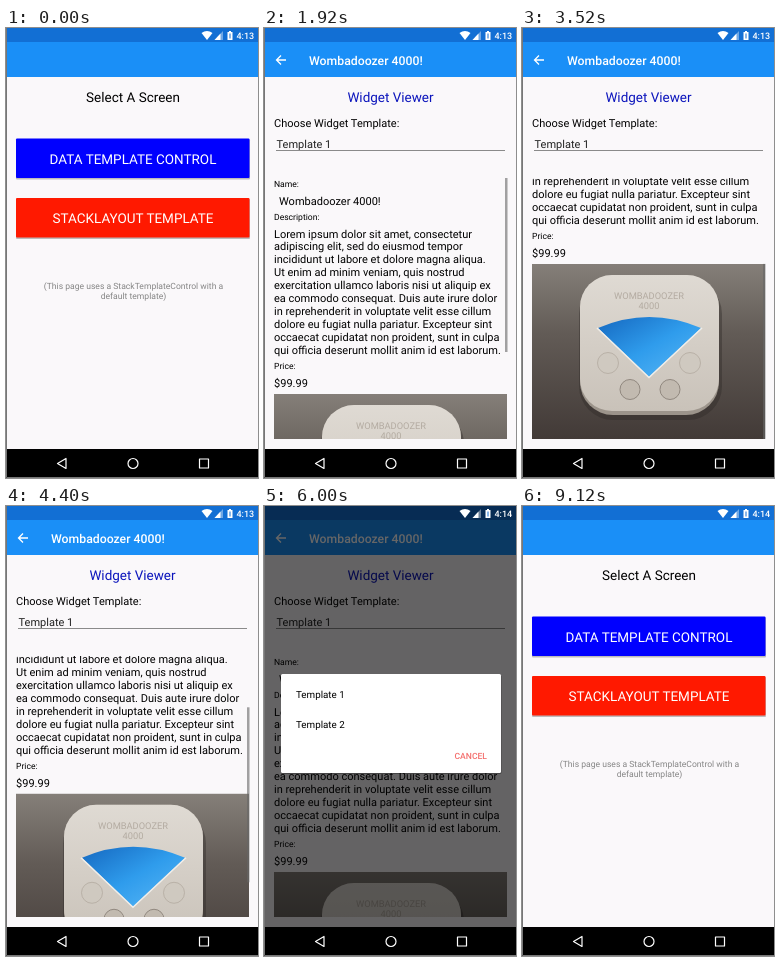
Animation of 252x450 px, one loop 9.2 s. Source, as an HTML page:

```html
<!DOCTYPE html>
<html lang="en">
<head>
<meta charset="utf-8">
<title>Template demo</title>
<style>
html, body { margin: 0; width: 100%; height: 100%; overflow: hidden; background: #000; }
svg { display: block; width: 252px; height: 450px; font-family: Roboto, "Noto Sans", sans-serif; fill: #000; text-rendering: geometricPrecision; }
.large { font-size: 13.49px; }
.medium { font-size: 11.03px; }
.small { font-size: 8.58px; }
.item { font-size: 9.8px; }
.bold { font-weight: 500; }
.mid { text-anchor: middle; }
.white { fill: #fff; }
</style>
</head>
<body>
<svg viewBox="0 0 252 450">
  <defs>
    <clipPath id="pageClip"><rect y="49" width="252" height="372"/></clipPath>
    <clipPath id="listClip"><rect y="150" width="252" height="261"/></clipPath>
    <clipPath id="noteClip"><rect x="126" y="236" width="126" height="84.5"/></clipPath>
    <linearGradient id="wall" x2="0" y2="1">
      <stop stop-color="#857f79"/><stop offset=".4" stop-color="#625b56"/><stop offset="1" stop-color="#423a37"/>
    </linearGradient>
    <linearGradient id="shell" x2="0" y2="1">
      <stop stop-color="#dfdad3"/><stop offset="1" stop-color="#c9c2b9"/>
    </linearGradient>
    <linearGradient id="fan" x2="1" y2="1">
      <stop stop-color="#1568c0"/><stop offset=".5" stop-color="#2f9cec"/><stop offset="1" stop-color="#5bb8f6"/>
    </linearGradient>
    <g id="photo">
      <rect width="233" height="175" fill="url(#wall)"/>
      <rect x="47" y="16" width="143" height="140" rx="34" fill="#2e2826" opacity=".4"/>
      <rect x="48" y="11" width="139" height="140" rx="33" fill="#9c948b"/>
      <rect x="48" y="11" width="139" height="136" rx="32" fill="url(#shell)"/>
      <g class="mid" font-size="9.3" style="fill:#b3aba1">
        <text x="117" y="35">WOMBADOOZER</text><text x="117" y="45">4000</text>
      </g>
      <g fill="#cfc9c0" stroke="#b9b1a7"><circle cx="76" cy="99" r="10.5"/><circle cx="158" cy="99" r="10.5"/></g>
      <path d="M66 64Q117 42 169 64L117 113Z" fill="url(#fan)"/>
      <path d="M65 64L117 113.5L170 64" fill="none" stroke="#f0eeea" stroke-width="1.5"/>
      <g fill="#c2bab0" stroke="#91887f"><circle cx="98" cy="125.5" r="10"/><circle cx="138" cy="125.5" r="10"/></g>
    </g>
  </defs>

  <rect width="252" height="421" fill="#faf8fa"/>
  <g clip-path="url(#pageClip)">
    <g id="home">
      <text class="large mid" x="127" y="74">Select A Screen</text>
      <rect x="10" y="111.5" width="234" height="40" rx="1" opacity=".25"/>
      <rect x="10" y="110.5" width="233.5" height="39.5" rx="1" fill="#00f"/>
      <text class="large mid white" x="127" y="136">DATA TEMPLATE CONTROL</text>
      <rect x="10" y="171" width="234" height="40" rx="1" opacity=".25"/>
      <rect x="10" y="170" width="233.5" height="39.5" rx="1" fill="#ff1900"/>
      <text class="large mid white" x="127" y="195">STACKLAYOUT TEMPLATE</text>
      <g class="small mid" fill="#858585">
        <text x="127.5" y="261">(This page uses a StackTemplateControl with a</text>
        <text x="127.5" y="271">default template)</text>
      </g>
    </g>
    <g id="viewer">
      <text class="large mid" x="126.5" y="74" fill="#0b14bc">Widget Viewer</text>
      <text class="medium" x="10" y="99">Choose Widget Template:</text>
      <text class="medium" id="choice" x="12.5" y="120" fill="#222"></text>
      <path d="M12 122.5H241" stroke="#8a8a8a"/>
      <g id="first" clip-path="url(#listClip)">
        <g id="list">
          <text class="small" x="10" y="158.5">Name:</text>
          <text class="medium" x="15" y="176.5">Wombadoozer 4000!</text>
          <text class="small" x="10" y="191.5">Description:</text>
          <g class="medium" id="longText"></g>
          <text class="small" x="10" y="341">Price:</text>
          <text class="medium" x="10" y="359">$99.99</text>
          <use href="#photo" x="10" y="366"/>
        </g>
        <rect id="bar" x="241" y="149" width="2.5" height="175" fill="#666"/>
      </g>
      <g id="second">
        <use href="#photo" transform="translate(71 149.5) scale(.485)"/>
        <text class="small" x="10" y="247">Wombadoozer 4000!</text>
        <g id="note" font-size="6.35" clip-path="url(#noteClip)"></g>
        <text class="large" x="10" y="341">$99.99</text>
      </g>
    </g>
  </g>

  <rect width="252" height="14" fill="#126fd4"/>
  <rect y="14" width="252" height="35" fill="#1a8ff7"/>
  <g id="heading">
    <path d="M22 32H13M17 27.5L12.5 32L17 36.5" fill="none" stroke="#fff" stroke-width="1.3"/>
    <text class="bold white" x="45" y="36.5" font-size="12.26">Wombadoozer 4000!</text>
  </g>
  <rect id="shade" width="252" height="421"/>
  <g fill="#fff">
    <path d="M195.5 5Q201 1 206.5 5L201 12Z"/>
    <path d="M217 3V12H208.5Z" opacity=".4"/>
    <path d="M214.5 5.6V12H208.5Z"/>
    <path d="M221.5 4H223V3H225V4H226.500V12H221.5Z"/>
    <path d="M224 5.5V10.5" stroke="#126fd4"/>
    <text class="bold" id="clock" x="230.5" y="11" font-size="9"></text>
  </g>
  <g id="dialog">
    <rect x="17" y="169" width="220.5" height="99" rx="1.5" opacity=".3"/>
    <rect x="17" y="168" width="220" height="99" rx="1.5" fill="#fff"/>
    <text class="item" x="32" y="192">Template 1</text>
    <text class="item" x="32" y="221.5">Template 2</text>
    <text class="small bold" x="223" y="253" text-anchor="end" fill="#f4706e">CANCEL</text>
  </g>

  <rect y="421" width="252" height="29"/>
  <g fill="none" stroke="#fff" stroke-width="1.2" stroke-linejoin="round">
    <path d="M51.5 435.5L60 430.5V440.5Z"/>
    <circle cx="127" cy="435.5" r="5"/>
    <rect x="193.5" y="431" width="9" height="9"/>
  </g>
  <path d="M.5 0V449.5H252" fill="none" stroke="#777"/>
</svg>
<script>
const LOOP = 9200, STEP = 80, MAX_SCROLL = 130;
const $ = id => document.getElementById(id);
const clamp = x => Math.min(1, Math.max(0, x));
const ramp = (t, a, b) => clamp((t - a) / (b - a));
const easeOut = p => 1 - (1 - p) ** 3;
const easeBoth = p => (1 - Math.cos(Math.PI * p)) / 2;

function addLines(id, x, y, gap, lines) {
  lines.split("|").forEach((line, i) => {
    const el = document.createElementNS("http://www.w3.org/2000/svg", "text");
    el.setAttribute("x", x);
    el.setAttribute("y", y + i * gap);
    el.textContent = line;
    $(id).append(el);
  });
}

addLines("longText", 10, 209.5, 12.93, "Lorem ipsum dolor sit amet, consectetur|adipiscing elit, sed do eiusmod tempor|incididunt ut labore et dolore magna aliqua.|Ut enim ad minim veniam, quis nostrud|exercitation ullamco laboris nisi ut aliquip ex|ea commodo consequat. Duis aute irure dolor|in reprehenderit in voluptate velit esse cillum|dolore eu fugiat nulla pariatur. Excepteur sint|occaecat cupidatat non proident, sunt in culpa|qui officia deserunt mollit anim id est laborum.");
addLines("note", 129, 244.3, 7.55, "Lorem ipsum dolor sit amet, consectetur|adipiscing elit, sed do eiusmod tempor|incididunt ut labore et dolore magna|aliqua. Ut enim ad minim veniam, quis|nostrud exercitation ullamco laboris nisi|ut aliquip ex ea commodo consequat.|Duis aute irure dolor in reprehenderit|in voluptate velit esse cillum dolore|eu fugiat nulla pariatur. Excepteur sint|occaecat cupidatat non proident, sunt|in culpa qui officia deserunt mollit anim");

function show(id, alpha, scale = 1, cy = 235) {
  const el = $(id);
  el.style.display = alpha > 0 ? "" : "none";
  el.setAttribute("opacity", alpha);
  el.setAttribute("transform", `translate(126 ${cy}) scale(${scale}) translate(-126 ${-cy})`);
}

function draw(t) {
  const open = easeOut(ramp(t, 1400, 1920));
  const close = easeOut(ramp(t, 8640, 9120));
  const closing = close > 0;
  show("home", closing ? close : 1 - open, closing ? .975 + .025 * close : 1 - .025 * open);
  show("viewer", closing ? 1 - close : open, closing ? 1 + .075 * close : 1.125 - .125 * open);
  show("heading", t >= 1520 && t < 8800 ? 1 : 0);

  const scroll = MAX_SCROLL * (easeBoth(ramp(t, 2720, 3520)) - easeBoth(ramp(t, 4000, 4920)));
  $("list").setAttribute("transform", `translate(0 ${-scroll})`);
  $("bar").setAttribute("y", 149 + scroll * 262 / 392);
  $("bar").setAttribute("opacity", .6 * (1 - ramp(t, 5200, 5600)));

  const second = t >= 6880;
  show("first", second ? 0 : 1);
  show("second", second ? 1 : 0);
  $("choice").textContent = "Template " + (second ? 2 : 1);
  $("clock").textContent = t < 5760 ? "4:13" : "4:14";

  const appear = easeOut(ramp(t, 5680, 6000));
  const leave = ramp(t, 6720, 7200);
  show("shade", .6 * appear * (1 - leave));
  show("dialog", appear * (1 - ramp(t, 6720, 7040)), .9 + .1 * appear, 217);
}

const start = performance.now();
function tick() {
  const t = (performance.now() - start) % LOOP;
  draw(Math.floor(t / STEP) * STEP);
  requestAnimationFrame(tick);
}
tick();
</script>
</body>
</html>
```
